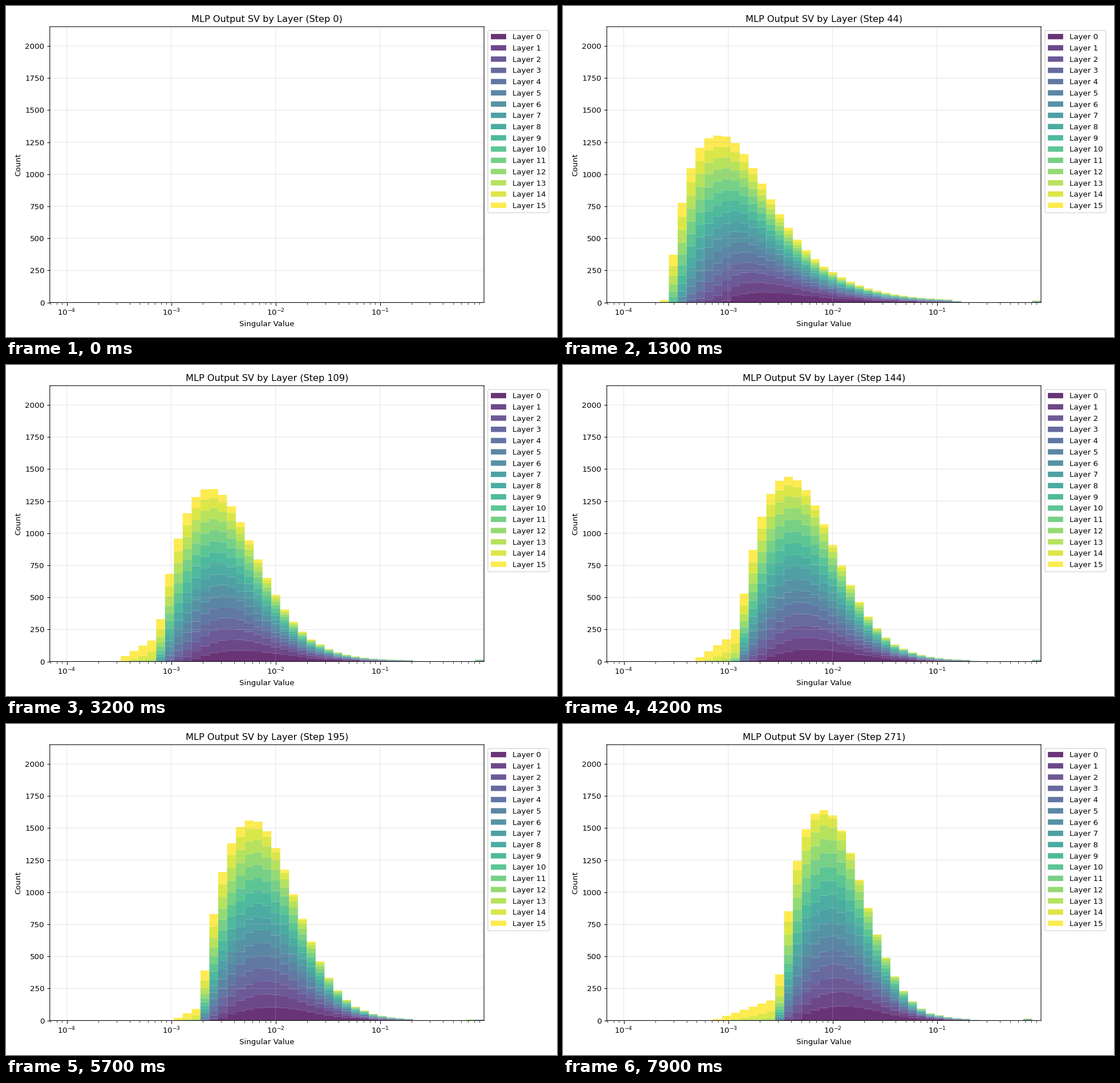
A matplotlib script that plays this animation: 966 px wide and 580 px high, repeating every 8000 ms.

```python
import numpy as np
import matplotlib.pyplot as plt
from matplotlib.animation import FuncAnimation
from matplotlib.patches import Patch

W, H, DPI = 966, 580, 96.6
FRAMES, INTERVAL = 80, 100
LAYERS, BINS = 16, 49
STEPS_PER_FRAME = 3.432
EDGES = np.logspace(-4.1626, -0.0036, BINS + 1)

layer = np.arange(LAYERS)[:, None]
bins = np.arange(BINS, dtype=float)

# Histogram shape at a few moments; positions are in bins.
KEYS = [13, 23, 42, 57, 70, 79]
SHAPE = {
    "height": [1302, 1268, 1440, 1562, 1620, 1640],
    "rise": [6.09, 6.48, 6.22, 6.12, 5.69, 5.43],
    "power": [2.8, 2.2, 2.1, 2.3, 2.3, 2.4],
    "fall": [1.308, 2.4, 8.5, 11.4, 12.3, 20.3],
    "bend": [6, 9, 15, 16, 16, 20],
    "foot": [30, 140, 210, 100, 190, 170],
    "spread": [1, 0.8, 0.5, 0.42, 0.42, 0.4],
    "lag": [0, 0.8, 3.7, 4.1, 4.1, 6.4],
    "end": [39.6, 40.5, 41.4, 40.9, 41.6, 41.4],
}
PEAK = ([1, 5, 10, 13, 23, 42, 57, 70, 79],
        [6.4, 9, 11.3, 12.4, 15.4, 20, 22.4, 22.45, 24])
START = ([1, 5, 10, 13, 23, 31, 42, 48, 57, 62, 66, 70, 75, 79],
         [-0.5, 2, 4.5, 5.5, 7.6, 6.7, 9.3, 8.8, 13.4, 11.8, 10.8, 12.4, 10.6, 11.5])
TOP = ([37, 42, 57, 70, 79], [16, 13.5, 7, 6, 0])


def profile(d, rise, power, fall, bend):
    """Steep rise to 1 at d = 0, then a hyperbolic fall in log height."""
    left = 1 - (np.maximum(-d, 0) / rise) ** power
    right = np.exp(-fall * (np.sqrt(1 + (np.maximum(d, 0) / bend) ** 2) - 1))
    return np.clip(np.where(d < 0, left, right), 0, 1)


def counts(i):
    if i == 0:
        return np.zeros((LAYERS, BINS))
    s = {name: np.interp(i, KEYS, vals) for name, vals in SHAPE.items()}
    peak, start = np.interp(i, *PEAK), np.interp(i, *START)
    curve = s["power"], s["fall"], s["bend"]

    # Bulk of the values, shared out between the layers
    d = bins - peak
    total = s["height"] * profile(d, s["rise"], *curve) + 8 * (d > 12)
    total *= np.clip(s["end"] - bins, 0, 1)
    shift = s["spread"] * (1.5 + 4 * np.exp(-layer / 1.5) - 3.2 * layer / 15)
    shift = shift - s["lag"] * np.exp(layer - 15.0)
    width = s["rise"] * (1.12 - 0.27 * s["spread"])
    share = profile(np.minimum(d, 14) - shift, width, *curve) + 1e-9
    out = total * share / share.sum(axis=0)

    # Low foot on the left, made of the last layers
    onset = peak - s["rise"]
    r = np.clip((bins - start) / (onset - start), 0, 1)
    foot = s["foot"] * r * np.clip(1 - (bins - onset) / 0.7, 0, 1)
    for k, part in ((15, 1 - 0.5 * r), (14, 0.35 * r), (13, 0.15 * r)):
        out[k] += foot * part

    # Largest value of each layer
    high = layer[:, 0] < np.interp(i, *TOP)
    out[:, 48] += high
    out[:, 47] += ~high
    return out


plt.rcParams["path.snap"] = False
fig = plt.figure(figsize=((W + 0.01) / DPI, (H + 0.01) / DPI), dpi=DPI,
                 facecolor="white")
ax = fig.add_axes([76.8 / W, 60.42 / H, 761.2 / W, 483.33 / H])
ax.set_xscale("log")
colors = plt.cm.viridis(np.linspace(0, 1, LAYERS))
zero = np.zeros(BINS)
stacks = [ax.stairs(zero, EDGES, baseline=zero, fill=True, color=c, alpha=0.8,
                    lw=0, snap=True)
          for c in colors]
ax.set_xlim(EDGES[0], EDGES[-1])
ax.set_ylim(0, 2150.4)
ax.set_xlabel("Singular Value")
ax.set_ylabel("Count")
ax.grid(True, alpha=0.3)
ax.legend(handles=[Patch(facecolor=c, alpha=0.8, lw=0, label=f"Layer {k}")
                   for k, c in enumerate(colors)],
          bbox_to_anchor=(1, 1), loc="upper left")


def update(i):
    tops = np.round(np.cumsum(counts(i), axis=0))
    base = zero
    for patch, top in zip(stacks, tops):
        patch.set_data(values=top, baseline=base)
        base = top
    ax.set_title(f"MLP Output SV by Layer (Step {int(i * STEPS_PER_FRAME)})")
    return stacks


anim = FuncAnimation(fig, update, frames=FRAMES, interval=INTERVAL,
                     init_func=lambda: update(0), repeat=True, repeat_delay=0)
plt.show()
```
